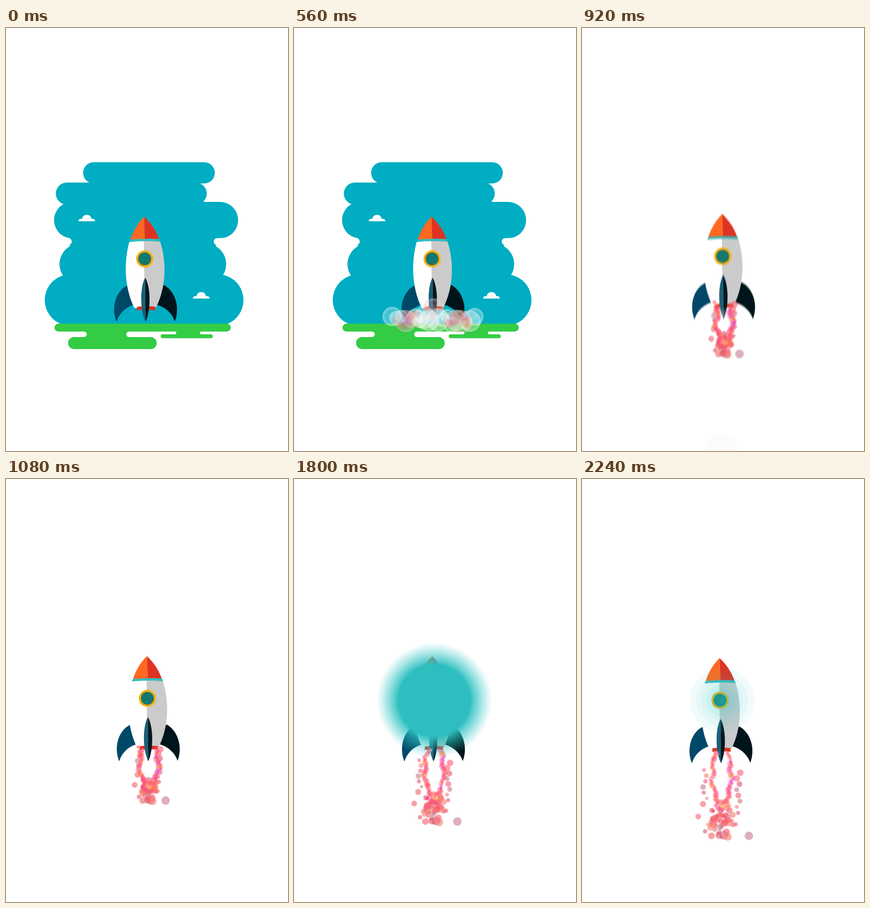
An HTML page with a canvas for the animation above (2.28 s loop, 611 by 917 pixels).

```html
<!DOCTYPE html>
<html lang="en">
<head>
<meta charset="utf-8">
<title>Rocket launch</title>
<style>
html, body { margin: 0; width: 100%; height: 100%; overflow: hidden; background: #fff; }
canvas { display: block; width: 611px; height: 917px; }
</style>
</head>
<body>
<canvas id="stage" width="611" height="917"></canvas>
<script>
const W = 611, H = 917, LOOP = 2280, STEP = 40, SAMPLES = 16;
const out = document.getElementById('stage').getContext('2d');
const buf = document.createElement('canvas');
buf.width = W;
buf.height = H;
let c = buf.getContext('2d');

const rnd = n => { const v = Math.sin(n * 12.9898 + 4.1) * 43758.5453; return v - Math.floor(v); };
const ramp = (t, a, b) => Math.max(0, Math.min(1, (t - a) / (b - a)));
const ease = u => (1 - Math.cos(Math.PI * u)) / 2;
const pick = (list, n) => list[Math.floor(rnd(n) * list.length)];

// Eased interpolation through [time, value] pairs
function along(keys, t) {
  for (let i = 1; i < keys.length; i++) {
    const [t0, a] = keys[i - 1], [t1, b] = keys[i];
    if (t <= t1) return a + (b - a) * ease(ramp(t, t0, t1));
  }
  return keys[keys.length - 1][1];
}

const SWAY = [[0, 0], [320, -3], [1160, 6], [1480, 0.3], [2280, -1.4]];
const LIFT = [[780, 0], [820, 4], [1080, -25], [1240, -29], [1440, -24.5], [1800, -24.5], [2240, -20.8]];

const drop = (t, start) => 40 * (Math.max(0, t - start) / 40) ** 3;

function pill(x0, x1, y0, y1, color) {
  c.fillStyle = color;
  c.beginPath();
  c.roundRect(x0, y0, x1 - x0, y1 - y0, (y1 - y0) / 2);
  c.fill();
}

function box(x0, x1, y0, y1, color) {
  c.fillStyle = color;
  c.fillRect(x0, y0, x1 - x0, y1 - y0);
}

function dot(x, y, r, color, alpha = 1) {
  c.globalAlpha = alpha;
  c.fillStyle = color;
  c.beginPath();
  c.arc(x, y, Math.max(0, r), 0, 7);
  c.fill();
  c.globalAlpha = 1;
}

function softDot(x, y, r, color, alpha) {
  dot(x, y, r * 1.3, color, alpha * 0.3);
  dot(x, y, r, color, alpha * 0.7);
}

function path(d, color) {
  c.fillStyle = color;
  c.fill(new Path2D(d));
}

function shifted(x, y, draw) {
  c.save();
  c.translate(x, y);
  draw();
  c.restore();
}

function sky(t) {
  const fall = drop(t, 780), blue = '#00adc2';
  if (fall > 640) return;
  shifted(0, fall, () => {
    c.beginPath();
    c.rect(0, 0, W, 642);
    c.clip();
    pill(167, 452.5, 291, 337, blue);
    pill(108, 435, 335, 383, blue);
    pill(104, 503, 377, 456, blue);
    pill(116, 477, 467, 557, blue);
    pill(84, 514.5, 534, 645.5, blue);
    box(138, 455, 450, 473, blue);
    pill(95, 142.5, 455.5, 470.5, '#fff');
    pill(450, 505, 455.5, 470.5, '#fff');
  });
}

function cloud(x, y) {
  path(`M${x} ${y}c0-4 3-6 8-5c0-5 4-9 10-9s10 4 10 9c5-1 8 1 8 5z`, '#fff');
}

function ground(t) {
  const fall = drop(t, 820), green = '#33cc44', drift = t * 0.0087;
  if (fall > 400) return;
  shifted(0, fall, () => {
    cloud(157 + drift, 419);
    cloud(405 + drift, 586.5);
    pill(105, 487, 641, 658, green);
    box(148, 313, 656, 672, green);
    pill(134.5, 326.5, 670, 696, green);
    box(345, 440, 656, 666, green);
    pill(335, 448, 664, 672.5, green);
    pill(104, 175, 658, 670, '#fff');
    pill(260.5, 332, 658, 670, '#fff');
    pill(331, 369, 658, 664, '#fff');
    pill(420, 457, 658, 664, '#fff');
  });
}

function rocket() {
  path('M263 558C238 570 227 606 239.5 637C245 619 258 606 277 600L280 575Z', '#004868');
  path('M342 557C366 570 378 605 366 636C360 619 347 606 327 600L326 575Z', '#00151b');
  path('M267 464C256 505 255 560 278 607L301 607L299 459Z', '#fff');
  path('M334 463C347.5 505 348 560 325 606L300.5 607L298.8 459Z', '#cbcbcb');
  path('M269.5 458.5Q300 455 332 457L334.5 463.5Q300 460.5 267 464Z', '#35bcbf');
  path('M299.5 409Q279 429 269.5 458.5Q285 457 301 457Z', '#ff6820');
  path('M299.5 409Q322 430 331.5 457.5Q316 456.5 301 457Z', '#de3322');
  dot(300.5, 500.5, 18.5, '#ffae00');
  dot(300.5, 500.5, 14, '#147870');
  path('M284 604.5Q303 602 323 604L323.5 612Q303 610 283.5 612Z', '#de3322');
  path('M301.5 541C290 562 290 612 302.5 637Z', '#1a5f78');
  path('M301.5 541C314 562 314 612 302.5 637Z', '#021820');
}

function smoke(t) {
  const fall = drop(t, 820), n = 19;
  if (t < 120 || fall > 420) return;
  const g = ((t - 120) / 680) ** 0.7;
  for (let i = 0; i < n; i++) {
    const s = (i + 0.5) / n * 2 - 1, near = 1 - Math.abs(s);
    const x = 302 + s * 128 * g;
    const y = 632 + (20 - rnd(i + 7) * (30 + 45 * near)) * g * g + fall;
    const r = (16 + rnd(i + 31) * 19) * g + 0.1;
    const tone = i % 6 === 3 ? '235,200,200' : '255,255,255';
    const fill = c.createRadialGradient(x, y, 0, x, y, r);
    fill.addColorStop(0, `rgba(${tone},.42)`);
    fill.addColorStop(0.6, `rgba(${tone},.24)`);
    fill.addColorStop(1, `rgba(${tone},.46)`);
    dot(x, y, r, fill);
    c.strokeStyle = 'rgba(225,215,212,.35)';
    c.stroke();
  }
}

const FIRE = ['#f08a58', '#e8587c', '#d8a070', '#d868c8', '#e87860'];
const HOT = ['#fff', '#fff6e0', '#ffe9f2'];
const PINKS = ['#ff3f6e', '#ff6f5c', '#ff5a9d', '#ff4f88', '#ff8a58'];
const DUST = ['#e0506a', '#f0606a', '#ff5a70', '#c8788c', '#f57a70'];
const GLOW = ['#ffd060', '#ffb04a', '#ff8a60', '#ffe7a0', '#ff5aa8'];

function ignition(t) {
  const show = ramp(t, 120, 240) * (1 - ramp(t, 430, 660));
  if (!show) return;
  const spread = 50 * ((t - 120) / 200) ** 0.6;
  for (let i = 0; i < 64; i++) {
    const s = rnd(i) * 2 - 1;
    const hot = Math.abs(s) < 0.25 + rnd(i + 90) * 0.45;
    const y = 630 + (rnd(i + 400) - 0.5) * 26 + 3 * Math.abs(s);
    softDot(299 + s * spread, y, 4 + rnd(i + 300) * 6, pick(hot ? HOT : FIRE, i + 200), show * 0.5);
  }
}

function exhaust(t) {
  if (t < 600) return;
  const push = 1 - (1 - ramp(t, 600, 800)) ** 2;
  const show = ramp(t, 600, 700);
  const age = Math.max(t, 800) - 1080;

  // Debris drifts outwards and down; x and y are its place at age 0
  const debris = (x, y, r, id) => {
    const px = 304 + (x - 304) * (1 + 0.00055 * age) * push;
    const py = 612 + (y + age * (0.05 + 0.0002 * (y - 660)) - 612) * push;
    const size = r * (0.4 + 0.6 * push), color = pick(DUST, id);
    dot(px, py, size, color, 0.42 * show);
    dot(px, py, size - 1.2, color, 0.3 * show);
  };

  // White heart of the jet while it is over the scenery
  const heart = show * (1 - ramp(t, 820, 960));
  for (let i = 0; i < 9 && heart; i++) softDot(304 + 3 * Math.sin(i * 2), 622 + i * 7 * push, 9, '#fff', 0.55 * heart);

  debris(340, 722, 9.5, 2);
  debris(273, 688, 6.5, 5);
  debris(307, 721, 10, 9);
  for (let i = 0; i < 14; i++) {
    const side = i % 2 ? 1 : -1;
    debris(304 + side * (19 + rnd(i + 40) * 6), 606 + i * 5, 3.5 + rnd(i + 60) * 4, i + 80);
  }
  for (let i = 0; i < 50; i++) {
    const s = rnd(i + 500) + rnd(i + 560) - 1;
    debris(305 + s * 28, 677 + 48 * rnd(i + 620) ** 1.4, 3.5 + rnd(i + 680) * 5.5, i + 740);
  }

  const meet = 612 + (689 + 0.031 * age - 612) * push;
  const open = 0.6 + 0.4 * ramp(t, 780, 1000);
  const n = 54;
  for (const side of [-1, 1]) {
    for (let i = 0; i < n; i++) {
      const id = i + 850 + side * 50;
      const u = (i / n + t / 1200) % 1;
      const y = 611 + u * (meet - 611);
      const half = (13 + 7 * Math.sin(Math.PI * u)) * Math.sqrt(1 - u ** 6) * open;
      const wave = 2.5 * Math.sin(y * 0.16 + side * 2 - t / 300);
      const x = 304 + side * half + wave + (rnd(id) - 0.5) * 6;
      const color = side > 0 && rnd(id + 40) < 0.3 ? '#f04fe0' : pick(PINKS, id + 80);
      softDot(x, y, 2 + rnd(id + 120) * 3.4, color, 0.5 * show);
      dot(x - side * 3, y, 1.7, '#fff0f8', 0.4 * show);
    }
  }
  for (let i = 0; i < 22; i++) {
    const a = i * 2.4, d = 3.6 * Math.sqrt(i);
    softDot(305 + Math.cos(a) * d, meet + 3 + Math.sin(a) * d * 0.7,
      3 + rnd(i + 700) * 3, pick(i < 10 ? GLOW : PINKS, i + 720), 0.5 * show);
  }
}

function scene(t) {
  box(0, W, 0, H, '#fff');
  sky(t);
  ground(t);
  const x = along(SWAY, t), y = along(LIFT, t);
  shifted(x, y, rocket);
  smoke(t);
  ignition(t);
  shifted(x, y, () => exhaust(t));
}

const wipeRadius = t => t < 2050
  ? 13.8 * (Math.exp(0.0105 * Math.max(0, t - 1600)) - 1)
  : 0.114 * Math.max(0, 2246 - t) ** 2;

// Shutter time around t, cut into even samples
const shutter = t => Array.from({ length: SAMPLES }, (_, i) => t + STEP * ((i + 0.5) / SAMPLES - 0.5));

// Nested discs, widest first, add up to the average cover
function wipe(t) {
  shutter(t).map(wipeRadius).sort((a, b) => b - a)
    .forEach((r, i) => r && dot(304, 480, r, '#2fbebf', 1 / (SAMPLES - i)));
}

function render(t) {
  const moments = t > 760 && t < 960 ? shutter(t) : [t];
  moments.forEach((m, i) => {
    scene(m);
    out.globalAlpha = 1 / (i + 1);
    out.drawImage(buf, 0, 0);
  });
  out.globalAlpha = 1;
  const inner = c;
  c = out;
  wipe(t);
  c = inner;
}

let start, last = -1;
function tick(now) {
  if (start === undefined) start = now;
  const t = Math.floor((now - start) % LOOP / STEP) * STEP;
  if (t !== last) render(last = t);
  requestAnimationFrame(tick);
}
requestAnimationFrame(tick);
</script>
</body>
</html>
```
